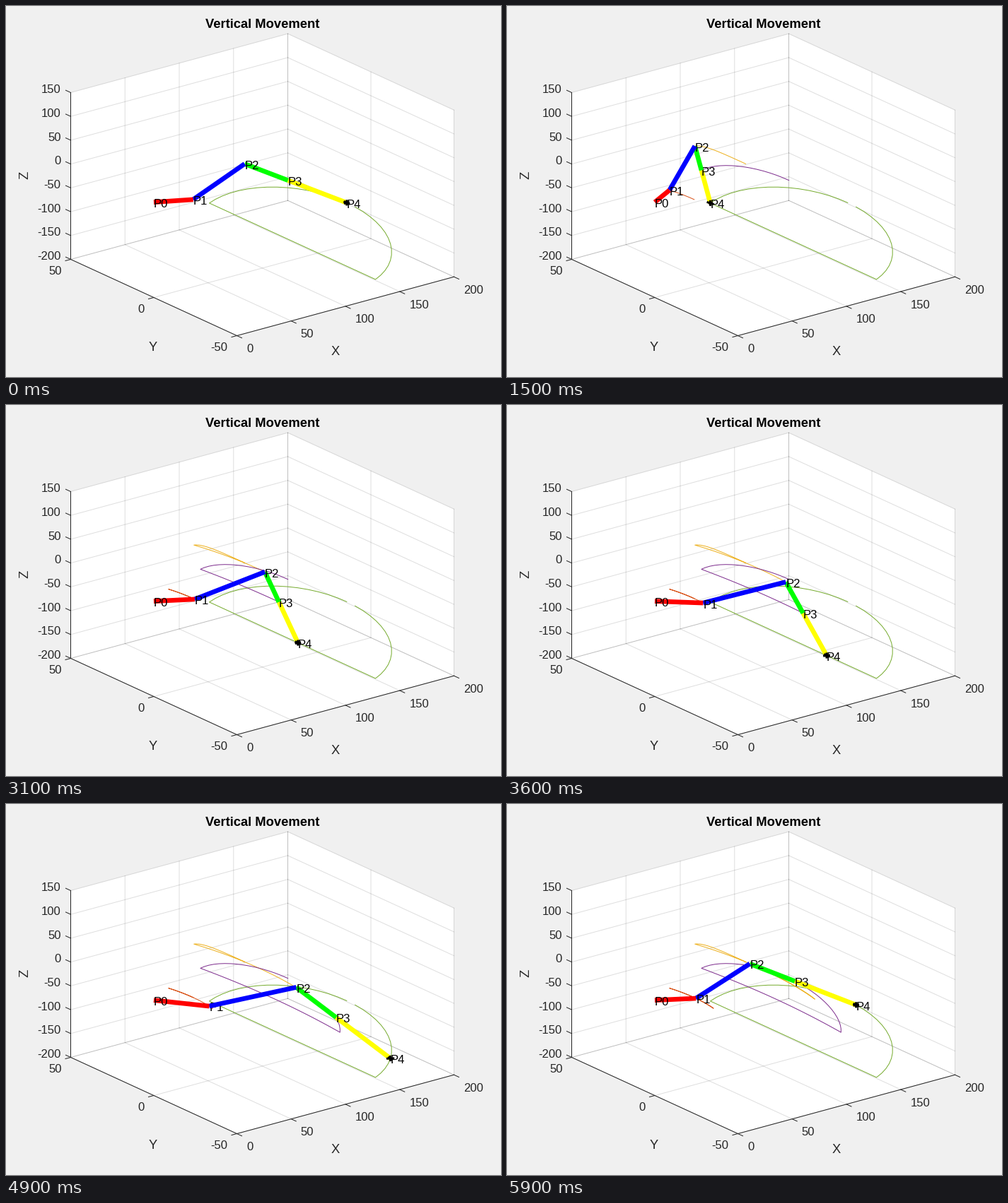
Animation of 700x525 px, one loop 6 s. Source, as a matplotlib script:

```python
import numpy as np
import matplotlib.pyplot as plt
from matplotlib.animation import FuncAnimation

W, H, DPI = 700, 525, 100
STEPS = 60
DARK = (0.15, 0.15, 0.15)
GRID = dict(color=DARK, alpha=0.15, lw=0.72, zorder=1, snap=False)
EDGE = dict(color=DARK, lw=0.72, zorder=2, snap=False)

plt.rcParams["font.family"] = "Liberation Sans"
fig = plt.figure(figsize=(W / DPI, H / DPI), dpi=DPI, facecolor=(0.94, 0.94, 0.94))
ax = fig.add_axes([0, 0, 1, 1])
ax.set_xlim(0, W)
ax.set_ylim(H, 0)
ax.axis("off")


def pt(pixels):
    return pixels * 72 / DPI


def project(p):
    """Map data coordinates (..., 3) to stage pixels (..., 2)."""
    x, y, z = np.moveaxis(np.asarray(p, float), -1, 0)
    sx = 326.5 + 1.535 * x - 2.35 * (y + 50)
    sy = 466.5 - 0.41625 * x - 1.08 * (y + 50) - 0.6743 * (z + 200)
    return np.stack([sx, sy], axis=-1)


def depth(p):
    """Nearness to the viewer, larger is closer."""
    x, y, z = p
    return 0.866 * (-0.609 * x / 200 - 0.793 * y / 100) + 0.5 * z / 350


def segment(a, b, **style):
    ax.plot(*project([a, b]).T, **style)


def write(x, y, s, size=16.67, color=DARK, **kw):
    return ax.text(x, y, s, fontsize=pt(size), color=color, **kw)


# ---- axes box ----
XT, YT, ZT = range(0, 201, 50), range(-50, 51, 50), range(-200, 151, 50)

walls = [
    [(0, -50, -200), (200, -50, -200), (200, 50, -200), (0, 50, -200)],
    [(0, 50, -200), (200, 50, -200), (200, 50, 150), (0, 50, 150)],
    [(200, 50, -200), (200, -50, -200), (200, -50, 150), (200, 50, 150)],
]
for wall in walls:
    ax.fill(*project(wall).T, color="white", lw=0, zorder=0)

for x in XT:
    segment((x, -50, -200), (x, 50, -200), **GRID)
    segment((x, 50, -200), (x, 50, 150), **GRID)
for y in YT:
    segment((0, y, -200), (200, y, -200), **GRID)
    segment((200, y, -200), (200, y, 150), **GRID)
for z in ZT:
    segment((0, 50, z), (200, 50, z), **GRID)
    segment((200, 50, z), (200, -50, z), **GRID)

segment((0, 50, -200), (0, 50, 150), **EDGE)
segment((0, 50, -200), (0, -50, -200), **EDGE)
segment((0, -50, -200), (200, -50, -200), **EDGE)


def tick(p, step, offset, value, ha):
    x, y = project(p)
    ax.plot([x, x + step[0]], [y, y + step[1]], **EDGE)
    write(x + offset[0], y + offset[1], str(value), ha=ha, va="baseline")


for x in XT:
    tick((x, -50, -200), (7, 3.2), (13.6, 23.6), x, "left")
for y in YT:
    tick((0, y, -200), (-7.5, 2), (-13, 21.2), y, "right")
for z in ZT:
    tick((0, 50, z), (-7, -3.2), (-14, 0.7), z, "right")

write(363, 31, "Vertical Movement", 18.33, "black", weight="bold", ha="center")
write(466, 494.5, "X", 18.33, ha="center")
write(208, 488.5, "Y", 18.33, ha="center")
write(26.5, 239, "Z", 18.33, ha="center", va="center", rotation=90)

# ---- leg kinematics ----
HIP_R, HIP_Z = 36.3, -16.8
FEMUR, SHIN = 65.8, 168.3
ANKLE = 0.424  # share of the shin above P3


def foot(i):
    """Tilted half circle over 30 steps, then straight back over 30."""
    k = (i + 15) % STEPS
    if k < 30:
        a = np.pi * k / 30
        return np.array([127.7 + 50 * np.sin(a), -50 * np.cos(a),
                         -160.8 + 50 * np.sin(a)])
    return np.array([127.7, 50 - 100 * (k - 30) / 30, -160.8])


def pose(i):
    end = foot(i)
    yaw = np.arctan2(end[1], end[0])
    out = np.array([np.cos(yaw), np.sin(yaw), 0])
    dr, dz = np.hypot(end[0], end[1]) - HIP_R, end[2] - HIP_Z
    d = np.hypot(dr, dz)
    bend = np.arccos((d**2 + FEMUR**2 - SHIN**2) / (2 * d * FEMUR))
    lift = np.arctan2(dz, dr) + bend
    up = np.array([0, 0, 1])
    hip = HIP_R * out + HIP_Z * up
    knee = hip + FEMUR * (np.cos(lift) * out + np.sin(lift) * up)
    ankle = knee + ANKLE * (end - knee)
    return np.array([np.zeros(3), hip, knee, ankle, end])


poses = np.array([pose(i) for i in range(STEPS)])
tracks = project(poses)

# ---- moving parts ----
GREEN = (0.466, 0.674, 0.188)
TRAIL_COLORS = [(0.85, 0.325, 0.098), (0.929, 0.694, 0.125), (0.494, 0.184, 0.556)]

ax.plot(*tracks[:, 4].T, color=GREEN, lw=pt(1), zorder=3)
trails = [ax.plot([], [], color=c, lw=pt(1), zorder=4)[0] for c in TRAIL_COLORS]
links = [ax.plot([], [], color=c, lw=pt(6.67), solid_capstyle="butt")[0]
         for c in ("red", "blue", "lime", "yellow")]
labels = [write(0, 0, f"P{n}", color="black", ha="left", va="baseline")
          for n in range(5)]
tip, = ax.plot([], [], color="black", lw=pt(3), zorder=20, solid_capstyle="butt")


def tip_shape(end):
    """Small axis cross aligned with the leg's heading."""
    r = np.hypot(end[0], end[1])
    c, s = end[0] / r, end[1] / r
    pts = []
    for axis in ([2.6 * c, 2.6 * s, 0], [-1.8 * s, 1.8 * c, 0], [0, 0, 6]):
        pts += [end - axis, end + axis, np.full(3, np.nan)]
    return project(pts)


def update(i):
    joints, pix = poses[i], tracks[i]
    for n, line in enumerate(trails, 1):
        line.set_data(*tracks[:i + 1, n].T)
    for n, line in enumerate(links):
        line.set_data(*pix[n:n + 2].T)
        line.set_zorder(10 + depth(joints[n:n + 2].mean(axis=0)))
    for n, label in enumerate(labels):
        label.set_position((pix[n, 0], pix[n, 1] + 7.4))
        label.set_zorder(21 if n == 4 else 10 + depth(joints[n]))
    tip.set_data(*tip_shape(joints[4]).T)
    return [*trails, *links, *labels, tip]


anim = FuncAnimation(fig, update, frames=STEPS, interval=100,
                     repeat=True, repeat_delay=0, blit=False)
plt.show()
```
